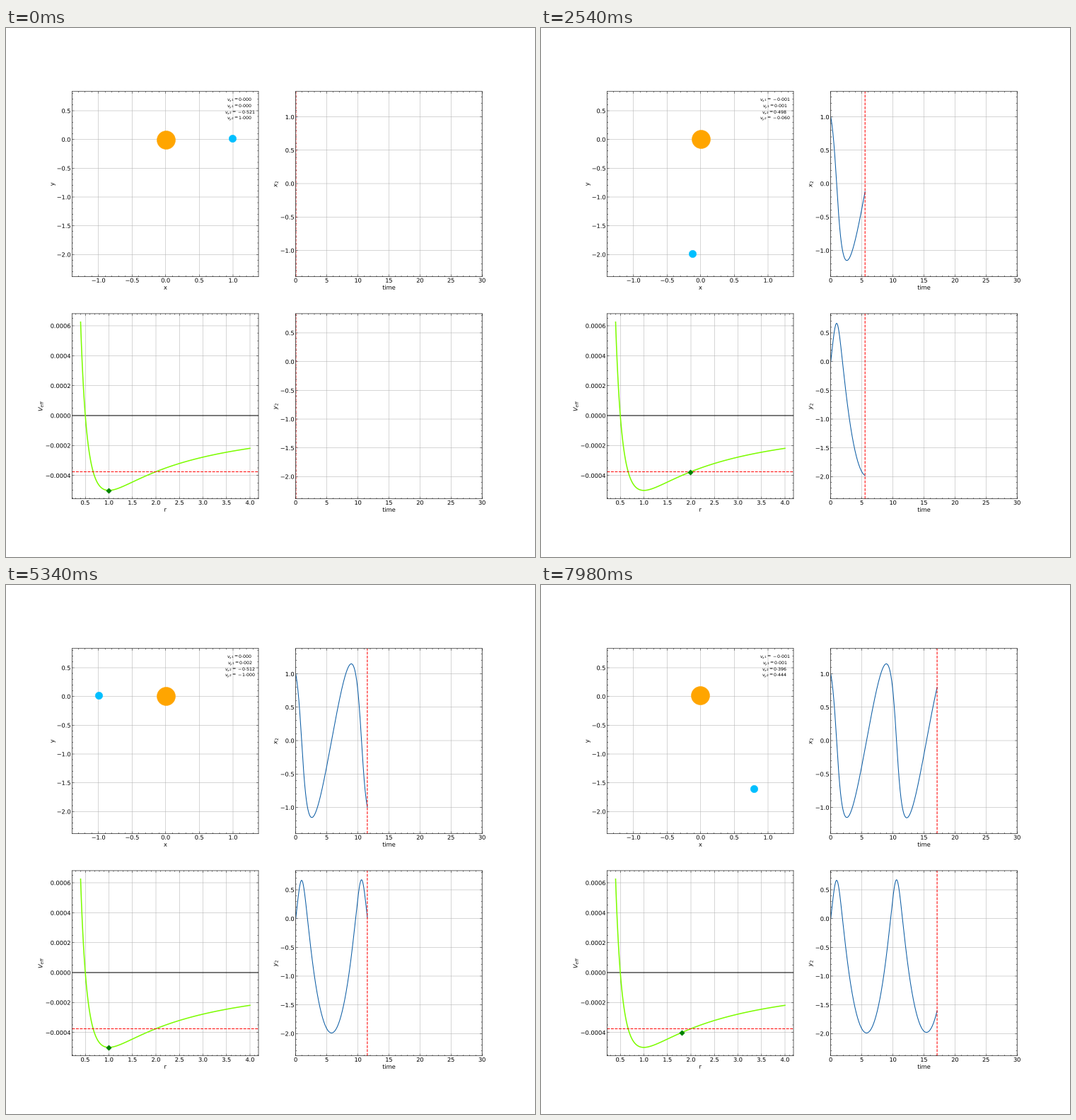
Write a matplotlib script that moves like this. It is 748 by 748 pixels and loops after 8 s.

```python
import numpy as np
import matplotlib.pyplot as plt
from matplotlib.animation import FuncAnimation
from matplotlib.ticker import MultipleLocator

STEP_MS, LOOP_MS = 20, 8000
DPI, FINE = 37.4, 4
T_END = 30
LAG = 0.021  # the integrator lands slightly past each tenth
M1, M2 = 1.0, 0.001
MU = M1 + M2

plt.rcParams.update({
    "font.family": "DejaVu Sans", "font.size": 16, "text.hinting": "none",
    "axes.linewidth": 1.2, "axes.grid": True, "axes.axisbelow": True,
    "grid.color": "#b0b0b0", "grid.linewidth": 1,
    "lines.linewidth": 2,
})
for k in ("xtick", "ytick"):
    plt.rcParams.update({
        f"{k}.direction": "in", f"{k}.minor.visible": True,
        f"{k}.major.size": 6, f"{k}.minor.size": 3,
        f"{k}.major.width": 1, f"{k}.minor.width": 1,
    })
plt.rcParams.update({"xtick.top": True, "ytick.right": True})

# Two-body orbit from the starting separation and velocity
R0, V0 = np.array([1.0, 0.0]), np.array([-0.5, 1.0])
H = R0[0] * V0[1] - R0[1] * V0[0]
A = MU / (2 * MU - V0 @ V0)
ECC_VEC = np.array([V0[1], -V0[0]]) * H / MU - R0
ECC = np.hypot(*ECC_VEC)
P = ECC_VEC / ECC
Q = np.array([-P[1], P[0]])
B = np.sqrt(1 - ECC**2)
RATE = np.sqrt(MU / A**3)
E0 = np.arctan2(R0 @ V0 / np.sqrt(MU * A), 1 - 1 / A)
MEAN0 = E0 - ECC * np.sin(E0)


def orbit(t):
    """Positions and velocities of both bodies, each of shape (len(t), 2)."""
    t = np.atleast_1d(np.asarray(t, float))
    mean = MEAN0 + RATE * t
    ea = mean + ECC * np.sin(mean)
    for _ in range(12):
        ea -= (ea - ECC * np.sin(ea) - mean) / (1 - ECC * np.cos(ea))
    c, s = np.cos(ea)[:, None], np.sin(ea)[:, None]
    rel = A * ((c - ECC) * P + B * s * Q)
    vel = RATE * A / (1 - ECC * c) * (-s * P + B * c * Q)
    vc = M2 / MU * V0
    center = M2 / MU * R0 + vc * t[:, None]
    return (center - M2 / MU * rel, center + M1 / MU * rel,
            vc - M2 / MU * vel, vc + M1 / MU * vel)


def v_eff(r):
    return M2 * (0.5 / r**2 - 1 / r)


def step_at(ms):
    """Steps come in threes: one held 100 ms, then two of 20 ms."""
    if ms < 20:
        return 0
    group, rest = divmod(ms - 20, 140)
    return 1 + 3 * group + (rest >= 100) + (rest >= 120)


ts = np.linspace(0, T_END, 1501)
path = orbit(ts)[1]
xlim = 1.2 * path[:, 0].min(), 1.2 * path[:, 0].max()
ylim = 1.2 * path[:, 1].min(), 1.2 * path[:, 1].max()

fig, axes = plt.subplots(2, 2, figsize=(20, 20), dpi=DPI)
(ax_xy, ax_x), (ax_v, ax_y) = axes


def setup(ax, xlabel, ylabel, xstep, ystep, xl, yl):
    ax.set(xlabel=xlabel, ylabel=ylabel, xlim=xl, ylim=yl)
    ax.xaxis.set_major_locator(MultipleLocator(xstep))
    ax.yaxis.set_major_locator(MultipleLocator(ystep))


rs = np.linspace(0.4, 4, 400)
static = [
    ax_v.axhline(0, color="black"),
    ax_v.plot(rs, v_eff(rs), color="#7cfc00", lw=3)[0],
    ax_v.axhline(-0.000375, color="red", ls="--"),
]
setup(ax_xy, "x", "y", 0.5, 0.5, xlim, ylim)
setup(ax_x, "time", "$x_2$", 5, 0.5, (0, T_END), xlim)
setup(ax_y, "time", "$y_2$", 5, 0.5, (0, T_END), ylim)
setup(ax_v, "r", "$V_{eff}$", 0.5, 0.0002, (0.22, 4.18),
      (-0.00055625, 0.00068125))

# Render the fixed parts once, smoothly, and keep them as a backdrop
for ax in axes.flat:
    ax.spines[:].set_visible(False)
fig.set_dpi(DPI * FINE)
fig.canvas.draw()
big = np.asarray(fig.canvas.buffer_rgba()).astype(float)
size = big.shape[0] // FINE
big = big[:size * FINE, :size * FINE]
backdrop = big.reshape(size, FINE, size, FINE, 4).mean(axis=(1, 3))
fig.set_dpi(DPI)
fig.figimage(backdrop.round().astype(np.uint8)).set_zorder(-1)

# Only the frames stay live, so that they cover the moving lines
for line in static:
    line.remove()
for ax in axes.flat:
    ax.xaxis.set_visible(False)
    ax.yaxis.set_visible(False)
    ax.patch.set_visible(False)
    ax.spines[:].set_visible(True)
    ax.spines[:].set_snap(False)


def dot(ax, size, color, marker="o"):
    return ax.scatter([0], [0], s=size**2, color=color, marker=marker,
                      linewidths=1, zorder=2)


sun = dot(ax_xy, 50, "orange")
planet = dot(ax_xy, 20, "deepskyblue")
mark = dot(ax_v, 10, "green", "D")
labels = [ax_xy.text(0.9, 0.948 - 0.0331 * k, "", transform=ax_xy.transAxes,
                     fontsize=12, ha="center", va="baseline")
          for k in range(4)]
curves = [ax.plot([], [], color="#0C5DA5")[0] for ax in (ax_x, ax_y)]
cursors = [ax.axvline(0, color="red", ls="--", snap=False)
           for ax in (ax_x, ax_y)]
setup(ax_xy, "x", "y", 0.5, 0.5, xlim, ylim)
setup(ax_v, "r", "", 0.5, 0.0002, (0.22, 4.18), (-0.00055625, 0.00068125))


def update(i):
    t = 0.1 * step_at(i * STEP_MS) + LAG
    p1, p2, v1, v2 = (a[0] for a in orbit(t))
    sun.set_offsets([p1])
    planet.set_offsets([p2])
    r = np.hypot(*(p2 - p1))
    mark.set_offsets([[r, v_eff(r)]])
    names = ("x1", "y1", "x2", "y2")
    for label, name, v in zip(labels, names, (*v1, *v2)):
        label.set_text(f"$v_{{{name}}} = {v:.3f}$")
    past = ts < t
    for k in (0, 1):
        curves[k].set_data(np.append(ts[past], t),
                           np.append(path[past, k], p2[k]))
        cursors[k].set_xdata([t, t])
    return [sun, planet, mark, *labels, *curves, *cursors]


anim = FuncAnimation(fig, update, frames=LOOP_MS // STEP_MS,
                     interval=STEP_MS, repeat=True, repeat_delay=0)
plt.show()
```
